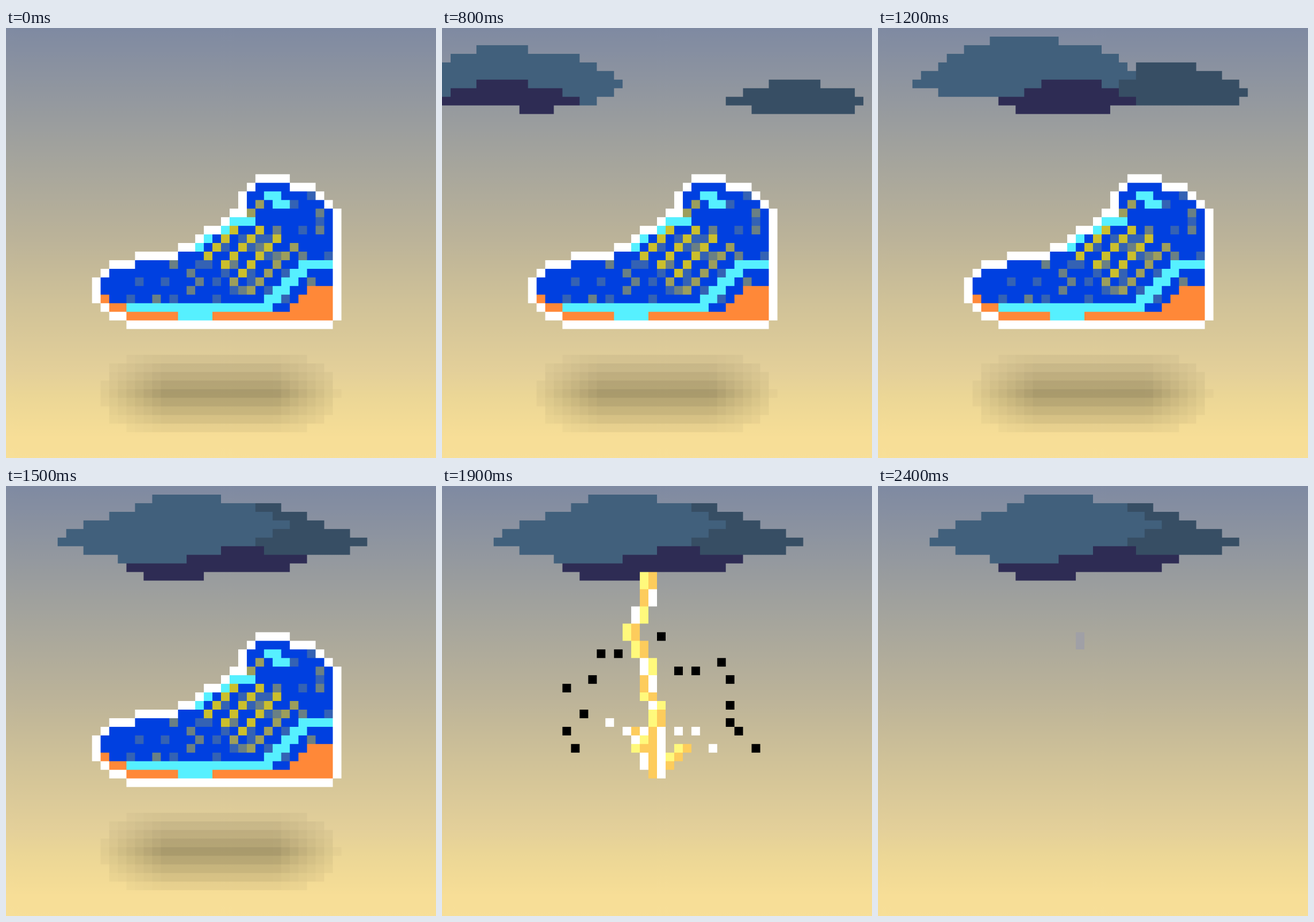
Write an HTML page with a canvas that moves like this. It is 748x748 px and loops after 2600 ms.

```html
<!DOCTYPE html>
<html lang="en">
<head>
<meta charset="utf-8">
<title>Storm over a sneaker</title>
<style>
html, body { margin: 0; width: 100%; height: 100%; overflow: hidden; background: #f7df98; }
canvas { display: block; width: 748px; height: 748px; }
</style>
</head>
<body>
<canvas id="stage" width="750" height="750"></canvas>
<script>
// A grid of 50 by 50 cells; the page scales it softly to the stage.
const GRID = 50, LOOP = 2600, STEP = 100;
const ctx = document.getElementById('stage').getContext('2d');
ctx.scale(750 / GRID, 750 / GRID);

const WHITE = '#fff', YELLOW = '#fff97c', GOLD = '#fdcc5c', SMOKE = '#a0a0a6';
const BLUE = '#0040e0', DENIM = '#3462b4', GREY = '#6a8084';
const OLIVE = '#9c9e5c', LACE = '#cbbf2c', CYAN = '#56f0ff', ORANGE = '#ff8838';

const clamp = v => Math.min(1, Math.max(0, v));
const mix = (a, b, t) => a.map((v, i) => v + (b[i] - v) * t);

// Repeatable random number in 0..1 for a pair of integers
function rand(a, b = 0) {
  const v = Math.sin(a * 12.9898 + b * 78.233) * 43758.5453;
  return v - Math.floor(v);
}

// Fills one row from column a to column b, both included.
function bar(color, row, a, b = a) {
  ctx.fillStyle = color;
  if (b >= a) ctx.fillRect(a, row, b - a + 1, 1);
}

// Interpolates key rows [row, ...columns] at a given row.
function at(keys, row) {
  let i = 1;
  while (i < keys.length - 1 && row > keys[i][0]) i++;
  const a = keys[i - 1], b = keys[i];
  return mix(a, b, clamp((row - a[0]) / (b[0] - a[0]))).slice(1);
}

function eachRow(keys, visit) {
  const last = Math.round(keys[keys.length - 1][0]);
  for (let row = Math.round(keys[0][0]); row <= last; row++) visit(row, ...at(keys, row));
}

// Sky
const sky = ctx.createLinearGradient(0, 0, 0, GRID);
[[0, '#7f8aa2'], [.3, '#a4a49d'], [.5, '#bdb499'], [.64, '#d0c298'],
 [.8, '#e4d09a'], [.86, '#ecd796'], [.95, '#f7de97'], [1, '#f7df98']]
  .forEach(([stop, color]) => sky.addColorStop(stop, color));

function drawSky() {
  ctx.fillStyle = sky;
  ctx.fillRect(0, 0, GRID, GRID);
}

// Ground shadow: flat in the middle, fading to the ends and by row
function drawShadow() {
  for (let row = 38; row < 47; row++) {
    for (let col = 10; col < 39; col++) {
      const tone = (1 - Math.abs(row - 42) / 5) * clamp((14.5 - Math.abs(col - 24.3)) / 8);
      if (tone > .1) bar(`rgba(0,0,0,${tone * .28})`, row, col);
    }
  }
}

// Sneaker outline: [row, left, right]
const body = [[18, 29, 32], [19, 28, 35], [21, 28, 37], [22, 26, 37], [25, 22, 37], [26, 20, 37],
  [27, 15, 37], [28, 12, 37], [29, 11, 37], [31, 11, 37], [32, 12, 37], [33, 14, 37]];

function eachBodyRow(visit) {
  eachRow(body, (row, a, b) => visit(row, Math.round(a), Math.round(b)));
}

function drawOutline() {
  eachBodyRow((row, a, b) => {
    bar(WHITE, row - 1, a, b);
    bar(WHITE, row, a - 1, b + 1);
    bar(WHITE, row + 1, a, b);
  });
}

// Woven texture, densest around the laces
function drawFabric() {
  eachBodyRow((row, a, b) => {
    bar(BLUE, row, a, b);
    for (let col = a; col <= b; col++) {
      const density = Math.max(.18, .55 - Math.hypot(col - 26, row - 27) / 18);
      const pick = rand(col, row) / density;
      if (pick < 1) bar(pick < .35 ? GREY : DENIM, row, col);
    }
  });
}

// Four parallel laces running down to the left
function drawLaces() {
  for (let i = 0; i < 4; i++) {
    const first = i ? 22 + i : 20, last = 26 + Math.round(i * 1.4);
    for (let row = first; row <= last; row++) {
      bar(i < 3 && row > 22 && row < 29 ? LACE : OLIVE, row, 49 + 3 * i - row);
    }
  }
}

function drawTrim() {
  eachBodyRow((row, a, b) => {
    if (row === 19 || row === 20) bar(CYAN, row, row + 11, row + 12);
    if (row >= 22 && row <= 25) bar(CYAN, row, a, row === 22 ? a + 2 : a);
    if (row >= 28 && row <= 31) bar(CYAN, row, 61 - row, 62 - row);
    if (row >= 30) bar(ORANGE, row, Math.max(65 - row, 33), b);
  });
  bar(CYAN, 27, 34, 37);
  bar(ORANGE, 31, 11);
  bar(ORANGE, 32, 12, 13);
  bar(CYAN, 32, 14, 30);
  bar(ORANGE, 33, 14, 37);
  bar(CYAN, 33, 20, 23);
}

function drawShoe() {
  drawOutline();
  drawFabric();
  drawLaces();
  drawTrim();
}

// Clouds: key rows [row, left, right] while apart and when merged; drift in cells per step
const clouds = [
  { color: '#374e64', drift: [2.8, .6],
    apart: [[5, 32, 37], [6, 29, 41], [7, 27, 42], [8, 30, 41]],
    merged: [[2, 29, 31], [4, 29, 36], [6, 29, 41], [7, 29, 39]] },
  { color: '#41607c', drift: [-3.6, .6],
    apart: [[1, 11, 16], [2, 8, 22], [5, 4, 27], [6, 4, 26], [7, 6, 24]],
    merged: [[1, 17, 24], [2, 15, 28], [4, 9, 32], [6, 6, 28], [8, 13, 20]] },
  { color: '#2e2c54', drift: [-6, 0],
    apart: [[6, 16, 21], [7, 13, 25], [8, 12, 27], [9, 21, 24]],
    merged: [[7, 25, 29], [8, 21, 34], [9, 14, 32], [10, 16, 22]] }
];

function drawClouds(k) {
  const away = Math.max(0, 10 - k), merge = clamp((k - 10) / 5);
  for (const { color, drift, apart, merged } of clouds) {
    const [x, y] = drift.map(d => Math.round(d * away));
    const shape = apart.map((key, i) => mix(key, merged[i], merge));
    eachRow(shape, (row, a, b) => bar(color, row + y, Math.floor(a) + x, Math.ceil(b) + x));
  }
}

// Lightning: a trunk and two arms, each [row, left] and two cells wide
const strike = [
  [[30, 20], [33, 23]], [[31, 27], [33, 25]],
  [[11, 20], [14, 19], [16, 19], [18, 21], [21, 24], [23, 24], [25, 22], [28, 22], [29, 23], [33, 24]]
];
const blast = [
  [[28, 21], [33, 24]], [[30, 27], [33, 24]],
  [[10, 23], [13, 23], [16, 21], [21, 23], [24, 23], [25, 24], [33, 24]]
];

function drawBolt(bolt, last = GRID) {
  const glow = [WHITE, YELLOW, GOLD];
  for (const path of bolt) {
    eachRow(path, (row, left) => {
      if (row > last) return;
      const col = Math.round(left), pick = Math.floor(rand(row >> 1, col) * 3);
      bar(glow[pick], row, col);
      bar(glow[(pick + 1) % 3], row, col + 1);
    });
  }
}

function drawSparks() {
  for (let i = 0; i < 7; i++) {
    bar(WHITE, 27 + Math.round(rand(i, 5) * 5), 19 + 2 * i);
  }
}

// Charred bits, flung outwards in an arc
function drawBits(spread) {
  for (let i = 0; i < 17; i++) {
    const angle = Math.PI * (1 + i / 16), reach = (.6 + .4 * rand(i, 3)) * spread;
    bar('#000', Math.round(30 + 14 * Math.sin(angle) * reach),
      Math.round(25 + 14 * Math.cos(angle) * reach));
  }
}

// The last wisp shrinks towards one point.
function drawSmoke(left) {
  ctx.fillStyle = SMOKE;
  ctx.fillRect(23, 17 - 2 * left, 1, 2 + 4 * left);
}

function draw(k) {
  drawSky();
  if (k < 19) drawShadow();
  if (k < 17) drawShoe();
  else if (k < 19) eachBodyRow((row, a, b) => bar('#000', row, a, b));
  if (k >= 3) drawClouds(k);

  if (k === 16) drawBolt(strike, 29);
  if (k === 17) drawBolt(strike);
  if (k >= 19 && k <= 21) drawBits(1 + (k - 19) * .12);
  if (k >= 18 && k <= 20) {
    ctx.globalAlpha = k === 20 ? .6 : 1;
    drawBolt(blast);
    if (k > 18) drawSparks();
    ctx.globalAlpha = 1;
  }
  if (k > 20) drawSmoke(Math.max(0, 24 - k));
}

const start = performance.now();
let shown = -1;
function tick() {
  const k = Math.floor(((performance.now() - start) % LOOP) / STEP);
  if (k !== shown) draw(shown = k);
  requestAnimationFrame(tick);
}
tick();
</script>
</body>
</html>
```
